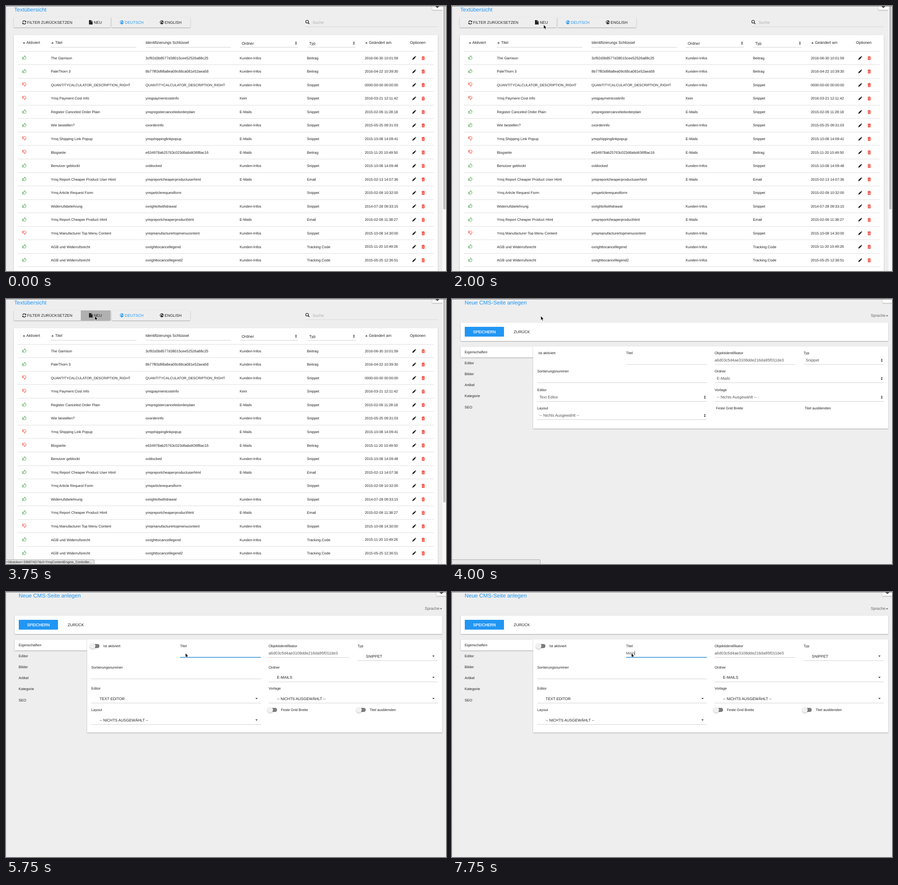
Animation, 965 px wide and 581 px high, one loop 8000 ms. Source, as an HTML page:

```html
<!DOCTYPE html>
<html lang="de">
<head>
<meta charset="utf-8">
<title>Textübersicht</title>
<style>
  html, body { margin: 0; width: 100%; height: 100%; overflow: hidden; background: #eee; }
  svg { display: block; width: 965px; height: 581px; }
  text { font-family: "Liberation Sans", Arial, sans-serif; text-rendering: geometricPrecision; white-space: pre; }
  .card { filter: drop-shadow(0 1px 1.2px rgba(0, 0, 0, .3)); }
</style>
</head>
<body>
<svg id="stage" viewBox="0 0 965 581"></svg>
<script>
const INK = '#212121', BLUE = '#2196f3', GREEN = '#43a047', RED = '#f44336', GREY = '#555';

// y is the vertical middle of the capitals
const text = (x, y, str, size = 8, fill = INK, more = '') =>
  `<text x="${x}" y="${y + size * .36}" font-size="${size}" fill="${fill}" ${more}>${str}</text>`;
const rect = (x, y, w, h, fill, more = '') =>
  `<rect x="${x}" y="${y}" width="${w}" height="${h}" fill="${fill}" ${more}/>`;
const card = (x, y, w, h, fill = '#fff') => rect(x, y, w, h, fill, 'class="card" rx="1"');
const rule = (x1, x2, y, fill = '#d2d2d2') => rect(x1, y, x2 - x1, 1, fill);
const at = (x, y, body, more = '') => `<g transform="translate(${x} ${y}) ${more}">${body}</g>`;
const shape = (d, fill = INK) => `<path d="${d}" fill="${fill}"/>`;
const line = (d, stroke, width) => `<path d="${d}" fill="none" stroke="${stroke}" stroke-width="${width}"/>`;
const group = (id, body) => `<g id="${id}">${body}</g>`;

const sortMark = (x, y) => at(x, y, shape('M-2.6 1.3L0-1.4L2.6 1.3Z'));
const caretDown = (x, y, fill = INK) => at(x, y, shape('M-2.5-1.2H2.5L0 1.4Z', fill));
const upDown = (x, y) => at(x, y, shape('M-2-.8L0-3.6L2-.8ZM-2 .8H2L0 3.6Z', '#333'));

const thumb = (x, y, up) => at(x, y, line(
  'M-4-.4H-2V3.5H-4ZM-2-.3L-.6-1C.4-2 0-4 1-4.3C2.3-4.3 2-2 1.6-1H3.4C4.3-1 4.4 0 3.8.5C4 1.5 3.6 2.5 3 3C2.7 3.9 2 4 1 4C-.5 4-1 3.5-2 3.5',
  up ? GREEN : RED, .9), up ? '' : 'scale(1 -1)');
const pencil = (x, y) => at(x, y,
  shape('M-4 4L-3.4 1.2L1.3-3.3L3.3-1.3L-1.3 3.3ZM1.8-3.8L2.5-4.3Q3-4.5 3.4-4.2L4.2-3.3Q4.5-2.8 4.2-2.4L3.7-1.8Z') +
  line('M-3.2 2.2L-2.2 3.2', '#fff', .6));
const trash = (x, y) => at(x, y,
  shape('M-3.6-3.3H-1.6L-1.2-4.3H1.2L1.6-3.3H3.6V-2.4H-3.6ZM-3-2H3V3.4Q3 4.3 2.2 4.3H-2.2Q-3 4.3-3 3.4Z', RED) +
  line('M-1.4-.8V3M0-.8V3M1.4-.8V3', '#fff', .55));
const globe = (x, y, fill) => at(x, y, `<circle r="4.2" fill="${fill}"/>` +
  shape('M-2.8-1.9L-.6-3.2L.5-2L-.8-.8L-2-.4L-1.2 1L-1.5 2.6L-3.2.4ZM1.3-1.4L3.2-1.2L3.4.8L2 2.3L1.2.6Z', '#eee'));
const refresh = (x, y) => at(x, y,
  line('M-3.5-.8A3.6 3.6 0 0 1 2.8-2.3M3.5.8A3.6 3.6 0 0 1-2.8 2.3', INK, 1.4) +
  shape('M4.2-4V-.8H1ZM-4.2 4V.8H-1Z'));
const file = (x, y) => at(x, y, shape('M-4-4.7H.6V-1.2H4V4.7H-4ZM1.3-4.7L4-1.9H1.3Z'));
const gearTab = (x, gear) => card(x, -8, 22, 16.5) + (gear
  ? at(x + 11, -1, `<circle r="3.6" fill="${INK}"/>` + line('M-5 1H5M0 0V5M-3.3 3.2L0 0L3.3 3.2', INK, 1.8) + '<circle r="1.4" fill="#fff"/>')
  : '');
const toggle = (x, y) => rect(x - 2, y - 4.5, 17, 9, '#7d7d7d', 'rx="4.5"') +
  `<circle cx="${x}" cy="${y}" r="6.2" fill="#f1f1f1" class="card"/>`;

// enabled | title | key | folder | type | changed
const rows = `+|The Garrison|3cf92d3b8577d38015cee52526a88c25|Kunden-Infos|Beitrag|2016-06-30 10:01:59
+|PaleThorn 3|8b77f83d98a8ea09c68ca081e52aea58|Kunden-Infos|Beitrag|2016-04-22 10:39:30
-|QUANTITYCALCULATOR_DESCRIPTION_RIGHT|QUANTITYCALCULATOR_DESCRIPTION_RIGHT|Kunden-Infos|Snippet|0000-00-00 00:00:00
-|Ymq Payment Cost Info|ymqpaymentcostinfo|Kein|Snippet|2016-03-21 12:11:42
+|Register Canceled Order Plain|ymqregistercanceledorderplain|E-Mails|Snippet|2015-02-09 11:28:18
+|Wie bestellen?|oxorderinfo|Kunden-Infos|Snippet|2015-05-25 09:31:03
-|Ymq Shipping Link Popup|ymqshippinglinkpopup|E-Mails|Snippet|2015-10-08 14:09:41
-|Blogseite|e634978ab25763c023d6abd436f8ac16|E-Mails|Beitrag|2015-11-20 10:49:50
+|Benutzer geblockt|oxblocked|Kunden-Infos|Snippet|2015-10-08 14:09:48
+|Ymq Report Cheaper Product User Html|ymqreportcheaperproductuserhtml|E-Mails|Email|2015-02-13 14:07:36
+|Ymq Article Request Form|ymqarticlerequestform||Snippet|2015-02-09 10:32:00
+|Widerrufsbelehrung|oxrightofwithdrawal|Kunden-Infos|Snippet|2014-07-28 09:33:15
+|Ymq Report Cheaper Product Html|ymqreportcheaperproducthtml|E-Mails|Email|2015-02-09 11:38:27
-|Ymq Manufacturer Top Menu Content|ymqmanufacturertopmenucontent|Kunden-Infos|Snippet|2015-10-08 14:30:00
+|AGB und Widerrufsrecht|oxrighttocancellegend|Kunden-Infos|Tracking Code|2015-11-20 10:49:26
+|AGB und Widerrufsrecht|oxrighttocancellegend2|Kunden-Infos|Tracking Code|2015-05-25 12:36:51`.split('\n');
const columns = [98.5, 306, 512.5, 660, 787];

function tableRow(row, i) {
  const y = 113.8 + i * 29.56, [state, ...cells] = row.split('|');
  return thumb(40, y - .8, state === '+') +
    cells.map((cell, c) => text(columns[c], y, cell, c === 4 ? 7.87 : cell.includes('_') ? 7.68 : 7.95)).join('') +
    pencil(895, y + .3) + trash(915, y + .2) + rule(26, 938, Math.round(y + 14.3), '#dedede');
}

function listPage() {
  const S = 8.45;
  return text(18, 7.4, 'Textübersicht', 12, BLUE) +
    card(17, 25, 212, 22, '#eee') + card(232, 25, 172, 22, '#eee') +
    '<clipPath id="neu"><rect x="164" y="25" width="65" height="22"/></clipPath>' +
    '<circle id="ripple" cx="201.5" cy="40" clip-path="url(#neu)"/>' +
    refresh(40, 36) + text(46.3, 36.2, 'FILTER ZURÜCKSETZEN', S) +
    file(186, 35.8) + text(192.5, 36.2, 'NEU', S) +
    globe(254, 35.8, BLUE) + text(260.8, 36.2, 'DEUTSCH', S, BLUE) +
    globe(341.7, 35.8, INK) + text(348, 36.2, 'ENGLISH', S) +
    at(661, 35, '<circle cx="-.6" cy="-.6" r="3" fill="none" stroke="#333" stroke-width="1.4"/>' + line('M1.5 1.5L4.5 4.5', '#333', 1.7)) +
    text(672.5, 35.8, 'Suche', 8.7, '#b0b0b0') + rule(656, 947, 45, '#d8d8d8') +
    card(17, 64, 930, 530) +
    sortMark(39.5, 80.8) + text(44.6, 79.8, 'Aktiviert', S) +
    sortMark(102, 80.8) + text(107.8, 80.3, 'Titel', S) + rule(98, 286, 90) +
    text(306, 80.3, 'Identifizierungs Schlüssel', S) + rule(306, 493, 90) +
    text(517, 81.7, 'Ordner', 8.6) + upDown(636, 81.5) + rule(513, 640, 90) +
    text(665, 81.7, 'Typ', 8.6) + upDown(763, 81.5) + rule(661, 767, 90) +
    sortMark(790.5, 80.8) + text(796, 79.8, 'Geändert am', S) + text(886, 79.8, 'Optionen', S) +
    rule(26, 938, 99, '#dedede') + rows.map(tableRow).join('') +
    gearTab(935, true) +
    rect(957, 0, 8, 581, '#f8f8f8') + rect(959, -5, 5, 451, '#c0c0c0', 'rx="2.5"');
}

// the fields as plain browser controls, or restyled once the script has run
function fields(styled) {
  const L = 7.87;
  const label = (x, y, str) => text(x, y, str, L);
  const select = (x, end, top, str) => {
    const base = top + (styled ? 32 : 25);
    return (styled
      ? text(x + 18.3, top + 22.6, str.toUpperCase(), 8.4) + caretDown(end - 9.5, top + 22.6)
      : text(x + 4.7, top + 16.3, str, 8.7, GREY) + upDown(end - 4.5, top + 16.3)) + rule(x, end, base);
  };
  const step = styled ? 46.5 : 40.4;
  const y = i => Math.round(118 + i * step), none = '-- Nichts Ausgewählt --';
  const check = (x, top, str) => styled
    ? toggle(x, top + .5) + label(x + 23.5, top, str)
    : label(x - .5, top, str);
  return card(178, 104, 779, styled ? 204 : 180) +
    check(190, 118, 'Ist aktiviert') +
    label(381.8, 118, 'Titel') + rule(382, 559, 143) +
    label(576, 118, 'Objektidentifikator') + text(576, 134, 'a6d03c5d4ae3108dde216da95f011de3', 8.72, GREY) + rule(576, 753, 143) +
    label(771, 118, 'Typ') + select(771, 947, 118, 'Snippet') +
    label(187, y(1), 'Sortierungsnummer') + rule(187, 559, y(1) + 25) +
    label(576, y(1), 'Ordner') + select(576, 947, y(1) - (styled ? .5 : 0), 'E-Mails') +
    label(187, y(2), 'Editor') + select(187, 559, y(2), 'Text Editor') +
    label(576, y(2), 'Vorlage') + select(576, 947, y(2), none) +
    label(187, y(3), 'Layout') + select(187, 559, y(3), none) +
    check(579.5, y(3), 'Feste Grid Breite') + check(774, y(3), 'Titel ausblenden');
}

function formPage() {
  const tabs = ['Eigenschaften', 'Editor', 'Bilder', 'Artikel', 'Kategorie', 'SEO'];
  return text(27.8, 8, 'Neue CMS-Seite anlegen', 12, BLUE) +
    text(918.5, 36, 'Sprache', 8.6, '#666') + caretDown(954, 37, '#666') +
    card(19, 52, 938, 40) + rect(28, 61, 86, 21.5, BLUE, 'rx="1"') +
    text(46.3, 72, 'SPEICHERN', 8.5, '#fff', 'stroke="#fff" stroke-width=".25"') + text(135.3, 72, 'ZURÜCK', 8.55) +
    card(19, 104.5, 159, 23.5) +
    group('plain', fields(false) + gearTab(944, false)) +
    group('styled', fields(true) + gearTab(944, true)) +
    tabs.map((tab, i) => text(27.8, 116.2 + i * 24.1, tab, 7.85)).join('') +
    group('focus', rect(382, 142.6, 177, 1.4, '#1a86d0')) +
    text(381.8, 134, '', 8.5, GREY, 'id="typed"') + rect(382, 129, .8, 10, '#222', 'id="caret"');
}

const $ = id => document.getElementById(id);
$('stage').innerHTML = rect(0, 0, 965, 581, '#eee') +
  '<path d="M1.5 1V581" stroke="#d9d9d9" stroke-dasharray="2 2"/>' +
  group('list', listPage()) + group('form', formPage()) +
  group('status', rect(-1, 571.5, 194.5, 12, '#e6e6e6', 'stroke="#ababab" rx="1.5"') +
    text(.3, 576.6, '=0&amp;stoken=33687AD7&amp;cl=YmqContentEngine_Controller...', 7.15, '#222', 'id="link"')) +
  rect(0, 0, 965, 1, '#858585') +
  group('pointer', '<path d="M0 0V9.2L2.1 7.3L3.6 10.7L5.3 10L3.8 6.7H6.6Z" fill="#000" stroke="#fff" stroke-width=".8"/>');

const pointerStops = [[1000, 511.5, 7.5], [1250, 410.5, 20.5], [1500, 348.5, 35.5], [1750, 250.5, 47.5],
  [2000, 201, 41], [2750, 194.8, 37.3], [4750, 367.5, 62.5], [5000, 393.5, 134]];
const typing = [[0, ''], [6500, 'M'], [7000, 'Me'], [7500, 'Mei'], [7750, 'Mein']];
const latest = (stops, t) => stops.filter(s => s[0] <= t).pop();
const show = (id, on) => $(id).style.display = on ? '' : 'none';

function draw(t) {
  const form = t >= 4000, stop = latest(pointerStops, t), word = latest(typing, t)[1];
  show('list', !form);
  show('form', form);
  show('plain', t < 4250);
  show('styled', t >= 4250);
  show('focus', t >= 5250);
  show('caret', t >= 5250 && t < 5750 || t >= 6250);
  show('status', t >= 3000 && t < 4500);
  show('link', !form);
  show('pointer', stop);
  if (stop) $('pointer').setAttribute('transform', `translate(${stop[1]} ${stop[2]})`);

  $('ripple').setAttribute('r', t < 2750 ? 0 : t < 3000 ? 25 : 60);
  $('ripple').setAttribute('fill', t < 3000 ? '#d4d4d4' : t < 3750 ? '#b8b8b8' : '#b0b0b0');

  $('typed').textContent = word;
  $('caret').setAttribute('x', 382 + (word ? $('typed').getComputedTextLength() : 0));
}

function tick() {
  draw(performance.now() % 8000);
  requestAnimationFrame(tick);
}
tick();
</script>
</body>
</html>
```
